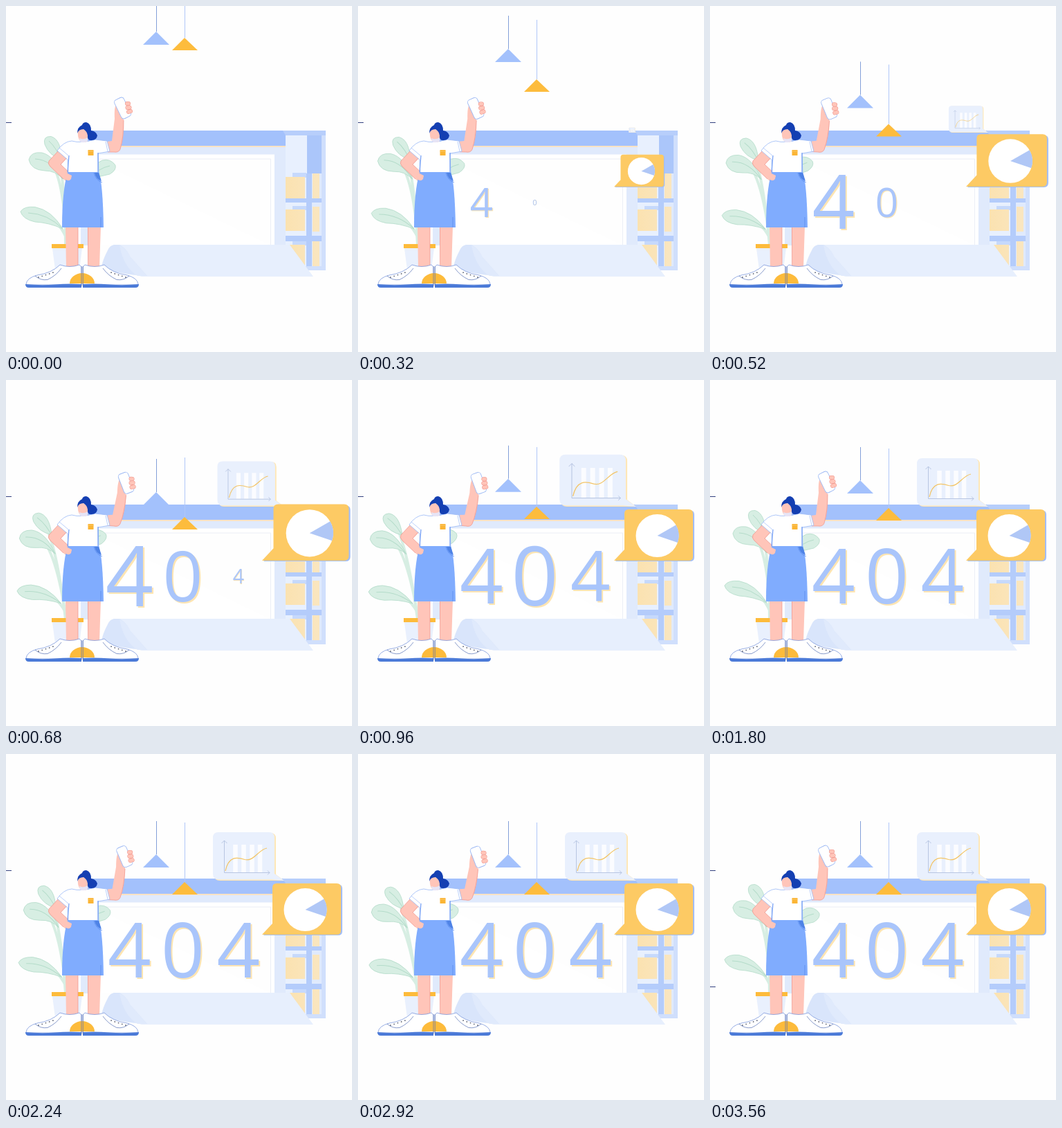
Write an HTML page that moves like this. It is 500 by 500 pixels and loops after 3.6 s.

```html
<!DOCTYPE html>
<html lang="en">
<head>
<meta charset="utf-8">
<title>404</title>
<style>
  html, body { margin: 0; width: 100%; height: 100%; overflow: hidden; background: #fefefe; }
  svg { display: block; width: 100vw; height: 100vh; }
  text { font: 400 110px "Open Sans", "Noto Sans", sans-serif; text-anchor: middle; }
  .leaf { fill: #d7eee3; stroke: #b4dcca; stroke-width: .8; }
  .vein { fill: none; stroke: #b4dcca; stroke-width: 1; }
  .stem { fill: none; stroke: #d7eee3; stroke-width: 4; stroke-linecap: round; }
  .skin { fill: #ffc5b9; }
  .edge { fill: none; stroke: #f0938a; stroke-width: .7; }
  .ink { fill: none; stroke: #5570b5; stroke-width: .7; }
</style>
</head>
<body>
<svg viewBox="0 0 500 500">
  <defs>
    <linearGradient id="box">
      <stop offset="0" stop-color="#fbe2b0"/><stop offset="1" stop-color="#fae6c0"/>
    </linearGradient>
    <g id="shoe">
      <path d="M29 402Q30 393 45 389Q66 386 78 374Q92 379 106 374L109 377V403H29Z" fill="#fff" stroke="#7d99dc" stroke-width=".8"/>
      <path d="M28 402Q50 404 70 402.500Q90 401 109 402V407H33Q28 407 28 402Z" fill="#4b7ad8"/>
      <path class="ink" d="M42 390Q50 397 60 395.500Q72 390 80 379"/>
      <path d="M47 392L70 384.500" stroke="#5c6273" stroke-width="1.800" stroke-linecap="round" stroke-dasharray="0 5.500" fill="none"/>
    </g>
  </defs>

  <!-- board -->
  <path d="M108 203H404V346H108Z" fill="#e0eafc"/>
  <path d="M120 214.500H388V346H120Z" fill="#fff"/>
  <path d="M125 221H382.500V346" fill="#fefefe" stroke="#eceef6"/>
  <path d="M118 180H404V202H118Z" fill="#a3c1fc"/>
  <path d="M118 202H404V204H118Z" fill="#f9e2c4"/>

  <!-- cabinet -->
  <path d="M404 180H462V382H404Z" fill="#d0dffc"/>
  <path d="M400 180H462V187H404Z" fill="#b7cefb"/>
  <path d="M404 187H435V278H404ZM404 284H435V332H404ZM404 340H435V376H404Z" fill="#e8f0fe"/>
  <path d="M435 187H456V242H435Z" fill="#abc6fa"/>
  <path d="M434 242H442V376H434ZM404 278H456V284H404ZM404 332H456V340H404Z" fill="#b4ccfb"/>
  <path d="M414 241H434V248H414ZM414 289H434V295H414ZM414 340H434V346H414Z" fill="#c6d9fc"/>
  <path d="M442 242H456V278H442ZM442 284H456V332H442ZM442 340H456V376H442Z" fill="#e0eafd"/>
  <g id="boxes" fill="url(#box)"></g>

  <!-- desk -->
  <path d="M156 345H410L444 391H196L140 374Z" fill="#e7effd"/>
  <path d="M156 345H164Q174 350 179 362L204 390Q160 388 138 377Q140 366 147 353Q150 346 156 345Z" fill="#d9e5fb"/>
  <path d="M164 346Q174 350 180 363L204 390H190Q170 378 164 346Z" fill="#e0eafc"/>

  <g id="digits"></g>

  <g id="lampA">
    <path d="M217.500 -48V0" stroke="#829fd9"/><path d="M217 0L236 19H198Z" fill="#a3c1fc"/>
  </g>
  <g id="lampB">
    <path d="M258.500 -86V0" stroke="#b0c7f8"/><path d="M258 0L277 18H240Z" fill="#fdbc3d"/>
  </g>

  <g id="plant">
    <path class="stem" d="M72 205Q85 240 86 345M62 222Q84 245 87 345M52 300Q76 308 87 335M142 233Q105 255 88 345"/>
    <path class="leaf" d="M80 222Q62 216 56 200Q53 188 65 188.500Q80 193 80 222Z"/>
    <path class="leaf" d="M82 250Q72 238 56 238Q36 237 33 222Q36 210 52 212Q72 217 82 250Z"/>
    <path class="leaf" d="M82 322Q62 313 42 312Q24 308 21 297Q26 289 42 290.500Q66 295 82 322Z"/>
    <path class="leaf" d="M120 250Q126 228 139 223Q151 220 158 230Q160 237 150 243Q137 246 120 250Z"/>
    <path class="vein" d="M62 195Q74 206 81 226M42 221Q66 222 82 250M32 299Q60 300 82 322M150 231Q134 234 120 250"/>
  </g>

  <!-- pot -->
  <path d="M67 350H110L105 388H72Z" fill="#e9f0fd"/>
  <path d="M66 344H112V350H66Z" fill="#fdbb3b"/>

  <!-- person -->
  <path class="skin" d="M86 318H104V378H87ZM118 318H137L135 378H119Z"/>
  <path class="edge" d="M104 320V376M118.500 320V376"/>
  <use href="#shoe"/>
  <use href="#shoe" transform="translate(220 0) scale(-1 1)"/>
  <path d="M92 401A18 15 0 0 1 128 401Z" fill="#fdbb3b"/>
  <path class="ink" d="M109 376V405M111.300 376V405"/>

  <g id="arm">
    <path class="skin" d="M146 196L153 195L157 163Q156 145 160 141L166 160L170 164Q171 190 165 207Q163 212 156 211L147 211Z"/>
    <path class="edge" d="M170 165Q170 190 165 207Q163 212 156 211L147 211"/>
    <rect x="-7.500" y="-15" width="15" height="30" rx="4" transform="translate(168.500 147.500) rotate(-26)" fill="#fff" stroke="#9db9f4" stroke-width=".9"/>
    <path d="M175 141L177 141M175.500 147L178.500 146.500M177 153L180 152" stroke="#f0938a" stroke-width="6" stroke-linecap="round"/>
    <path d="M175 141L177 141M175.500 147L178.500 146.500M177 153L180 152" stroke="#ffc5b9" stroke-width="5" stroke-linecap="round"/>
  </g>

  <path class="skin" d="M76 209L90 218L79 229L95 244L93 252Q88 256 83 250L64 232Q60 228 62 224Z"/>
  <path class="edge" d="M76 209L62 224Q60 228 64 232L83 250M88 219L79 229L95 244"/>
  <path d="M95 195Q108 199 129 193L146 195L150 210L133 213L134 242H90L89 222L74 209Q83 196 95 195Z" fill="#fff" stroke="#9ab9f7" stroke-width=".8"/>
  <path d="M91 216L89 240M133 212V240" stroke="#6f9cf5" stroke-width="1.200" fill="none"/>
  <path d="M77 205L90 216M144 196L147 210" stroke="#a9c4fa" stroke-width=".8"/>
  <path d="M118.500 208H126.500V216H118.500Z" fill="#fbb535"/>
  <path d="M118.500 210H126.500" stroke="#f9c766"/>
  <path d="M89 240H134Q140 256 141 320H81Q81 268 89 240Z" fill="#80acfe"/>
  <path d="M127 241Q130 252 139 255M137 305V320" fill="none" stroke="#5a8bec" stroke-width=".8"/>
  <path d="M128 241H134L138 253Q130 250 128 241Z" fill="#4f83e6"/>
  <path class="skin" d="M87 241L95 245L94 250Q90 255 84 249Z"/>
  <path class="skin" d="M104 180Q111 175 119 183L118 195Q112 199 107 195Q103 190 104 180Z"/>
  <path d="M106 191Q112 194 118 190V195Q112 199 107 196Z" fill="#e6e4f6"/>
  <path d="M103 184Q103 175 110 172Q111 168 116 168Q123 170 123 180Q130 181 132 187Q131 194 124 194Q117 195 118 187Q117 181 112 178Q105 178 103 184Z" fill="#143fb2"/>

  <g id="chart">
    <path d="M309 114H382Q390 114 390 122V174L402 183H309Q301 183 301 175V122Q301 114 309 114Z" fill="#ffe7b6"/>
    <path d="M307 113H380Q388 113 388 121V173L402 183L384 181.500H307Q299 181 299 173V121Q299 113 307 113Z" fill="#e9f0fd"/>
    <path d="M331.500 131V171M343.500 131V171M355.500 131V171M367 131V171" stroke="#fbfcff" stroke-width="6.500"/>
    <path d="M315.500 125V171.500H381M311.500 129L315.500 125L319.500 129M378 168.500L381 171.500L378 174.500" fill="none" stroke="#b3c1df" stroke-width=".9"/>
    <path d="M317 169C322 147 334 149 345 152.500C358 156 365 138 377 136" fill="none" stroke="#f3c465" stroke-width="1.200"/>
  </g>

  <g id="pie">
    <path d="M393 188.500H480Q486 188.500 486 194.500V256Q486 262 480 262H372L387 246V194Q387 188.500 393 188.500Z" fill="#a2bdf6"/>
    <path d="M391 187H478Q484 187 484 193V255Q484 261 478 261H370L385 245V193Q385 187 391 187Z" fill="#fdca64"/>
    <circle cx="432.500" cy="225" r="31" fill="#fff"/>
    <path d="M432.500 225L459.500 209.500A31 31 0 0 1 462 235Z" fill="#b0c7f6"/>
  </g>

  <path id="dashA" d="M0 168.500H8" stroke="#33417f"/>
  <path id="dashB" d="M0 336.500H8" stroke="#33417f"/>
</svg>
<script>
  const LOOP = 3600, STEP = 40, SWAY = 1800;
  const el = id => document.getElementById(id);
  const set = (node, value) => node.setAttribute("transform", value);

  el("boxes").innerHTML = [[247, 242], [294, 290], [345, 340]].map(([a, b]) =>
    `<path d="M404 ${a}H432V${a + 31}H404ZM443 ${b}H453V${b + 36}H443Z"/>`).join("");

  const digits = [["4", 178.5, 80], ["0", 255.5, 280], ["4", 336, 560]].map(([char, x, start]) => {
    const g = document.createElementNS("http://www.w3.org/2000/svg", "g");
    g.innerHTML = `<text x="2" y="41" fill="#ffe5b2">${char}</text>` +
      `<text y="39" fill="#a9c5fb">${char}</text>`;
    el("digits").append(g);
    return { g, x, start };
  });

  // Smooth curve through [time, value] points, flat at both ends.
  function track(keys, t) {
    const last = keys.length - 1;
    if (t <= keys[0][0]) return keys[0][1];
    if (t >= keys[last][0]) return keys[last][1];
    const i = keys.findIndex(k => k[0] > t) - 1;
    const slope = n => n <= 0 || n >= last ? 0 :
      (keys[n + 1][1] - keys[n - 1][1]) / (keys[n + 1][0] - keys[n - 1][0]);
    const [t0, a] = keys[i], [t1, b] = keys[i + 1];
    const d = t1 - t0, u = (t - t0) / d, v = 1 - u;
    return a * (1 + 2 * u) * v * v + b * (3 - 2 * u) * u * u +
      d * u * v * (slope(i) * v - slope(i + 1) * u);
  }

  const dropA = [[0, 37], [320, 62], [560, 141], [680, 162], [860, 141], [1040, 146], [1160, 145]];
  const dropB = [[0, 46], [320, 106], [560, 182], [680, 198], [860, 181], [1040, 186], [1160, 185]];
  const pop = [[40, .1], [120, .26], [240, .53], [400, .92], [560, 1.09], [640, 1.1], [840, 1]];

  const grow = u => u <= 0 ? 0 : u < 40 ? u / 400 : track(pop, u);

  function popFrom(id, x, y, u) {
    set(el(id), `translate(${x} ${y}) scale(${grow(u)}) translate(${-x} ${-y})`);
  }

  function draw(t) {
    const sway = (1 - Math.cos(2 * Math.PI * t / SWAY)) / 2;
    set(el("plant"), `rotate(${-7.6 * sway} 88 345)`);
    set(el("arm"), `rotate(${5.6 * sway} 156 208)`);

    set(el("lampA"), `translate(0 ${track(dropA, t)})`);
    set(el("lampB"), `translate(0 ${track(dropB, t)})`);

    for (const { g, x, start } of digits)
      set(g, `translate(${x} 284) scale(${grow(t - start)})`);
    popFrom("pie", 370, 262, t - 40);
    popFrom("chart", 402, 183, t - 270);

    const late = t >= 3400;
    el("dashA").style.opacity = t < 1160 || (t >= 1720 && t < 2560) || late ? 1 : 0;
    el("dashB").style.opacity = late ? 1 : 0;
  }

  const begin = performance.now();
  function tick() {
    const t = (performance.now() - begin) % LOOP;
    draw(Math.floor(t / STEP) * STEP);
    requestAnimationFrame(tick);
  }
  tick();
</script>
</body>
</html>
```
